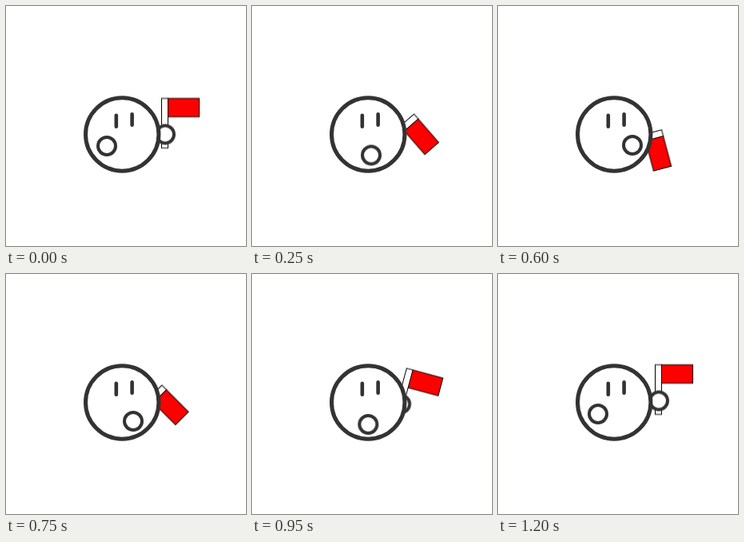
These frames come from a looping animation (300x300 px, 1750 ms). An HTML page without scripts:

```html
<!DOCTYPE html>
<html lang="en">
<head>
<meta charset="utf-8">
<title>Flag signal</title>
<style>
  html, body { margin: 0; width: 100%; height: 100%; overflow: hidden; background: #fff; }
  svg { display: block; width: 100%; height: 100%; }

  .outline { fill: #fff; stroke: #333; }
  .hand { stroke-width: 4; }
  .head { stroke-width: 5; }
  .eyes { stroke: #333; stroke-width: 4.6; stroke-linecap: round; }
  .flag { stroke: #000; stroke-width: 1; }

  /* 35 ticks of 50 ms; each segment advances one tick at a time */
  .flag-arm { animation: wave 1750ms infinite; }
  .free-arm { animation: swing 1750ms infinite; }

  @keyframes wave {
    0%      { transform: translate(199px, 160.5px) rotate(0deg);    animation-timing-function: steps(3); }
    8.571%  { transform: translate(180px, 164px) rotate(30deg);     animation-timing-function: steps(2); }
    14.285% { transform: translate(171.5px, 168px) rotate(49deg);   animation-timing-function: steps(3); }
    22.857% { transform: translate(163.2px, 171.8px) rotate(75deg); animation-timing-function: steps(4); }
    34.285% { transform: translate(162.2px, 170.8px) rotate(75deg); animation-timing-function: steps(3); }
    42.857% { transform: translate(166.2px, 174px) rotate(45deg);   animation-timing-function: steps(4); }
    54.285% { transform: translate(186px, 162.5px) rotate(15deg);   animation-timing-function: steps(2); }
    59.999% { transform: translate(198.6px, 160px) rotate(5deg);    animation-timing-function: steps(1); }
    62.857% { transform: translate(200.5px, 159.5px) rotate(0deg);  animation-timing-function: steps(2); }
    68.571%, 100% { transform: translate(201px, 158.5px) rotate(0deg); }
  }

  @keyframes swing {
    0%      { transform: translate(126px, 175px);   animation-timing-function: steps(3); }
    8.571%  { transform: translate(140px, 187px);   animation-timing-function: steps(2); }
    14.285% { transform: translate(149px, 186.5px); animation-timing-function: steps(3); }
    22.857% { transform: translate(162.3px, 179px); animation-timing-function: steps(4); }
    34.285% { transform: translate(168px, 174px);   animation-timing-function: steps(3); }
    42.857% { transform: translate(159px, 184px);   animation-timing-function: steps(4); }
    54.285% { transform: translate(145.3px, 188px); animation-timing-function: steps(3); }
    62.857% { transform: translate(131px, 182px);   animation-timing-function: steps(2); }
    68.571%, 100% { transform: translate(125px, 175px); }
  }
</style>
</head>
<body>
<svg viewBox="0 0 300 300">
  <g class="flag-arm">
    <g class="flag">
      <rect x="-4.5" y="-45" width="8" height="62" fill="#fff"/>
      <rect x="3.5" y="-45" width="39" height="23" fill="#f00"/>
    </g>
    <circle class="outline hand" r="11"/>
  </g>
  <circle class="outline head" cx="145.2" cy="160.5" r="45.7"/>
  <path class="eyes" d="M137.8 136.7V150.7M157.6 135.2V148.7"/>
  <g class="free-arm">
    <circle class="outline hand" r="11"/>
  </g>
</svg>
</body>
</html>
```
